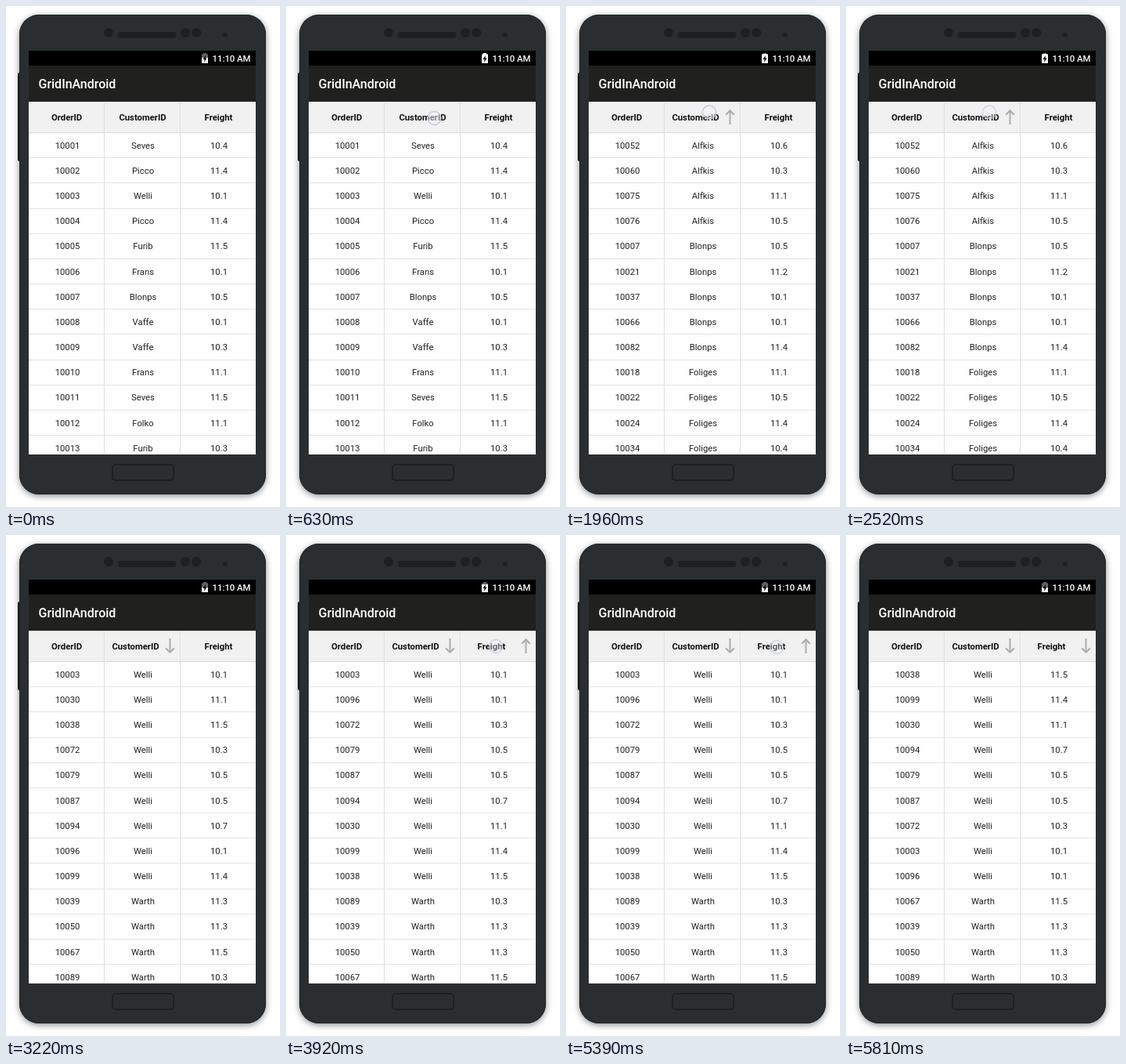
Animation of 350x639 px, one loop 5880 ms. Source, as an HTML page with a canvas:

```html
<!DOCTYPE html>
<html lang="en">
<head>
<meta charset="utf-8">
<title>Sortable grid</title>
<style>
html, body { margin: 0; width: 100%; height: 100%; overflow: hidden; background: #fff; }
canvas { display: block; width: 350px; height: 639px; }
</style>
</head>
<body>
<canvas id="stage"></canvas>
<script>
const W = 350, H = 639, LOOP = 5880, TICK = 70;
const canvas = document.getElementById('stage');
const ctx = canvas.getContext('2d');
const scale = window.devicePixelRatio || 1;
canvas.width = W * scale;
canvas.height = H * scale;

// Order number (offset from 10000) and freight, grouped by customer
const orders = {
  Alfkis: '52 10.6, 60 10.3, 75 11.1, 76 10.5',
  Blonps: '7 10.5, 21 11.2, 37 10.1, 66 10.1, 82 11.4',
  Foliges: '18 11.1, 22 10.5, 24 11.4, 34 10.4',
  Folko: '12 11.1',
  Frans: '6 10.1, 10 11.1',
  Furib: '5 11.5, 13 10.3',
  Picco: '2 11.4, 4 11.4',
  Seves: '1 10.4, 11 11.5',
  Vaffe: '8 10.1, 9 10.3',
  Warth: '39 11.3, 50 11.3, 67 11.5, 89 10.3',
  Welli: '3 10.1, 30 11.1, 38 11.5, 72 10.3, 79 10.5, 87 10.5, 94 10.7, 96 10.1, 99 11.4'
};
const rows = Object.entries(orders).flatMap(([name, list]) =>
  list.split(', ').map(item => {
    const [id, freight] = item.split(' ');
    return { id: 10000 + Number(id), name, freight };
  }));

// Sort direction per column: 1 ascending, -1 descending, 0 unsorted
const states = [
  { at: 0, name: 0, freight: 0 },
  { at: 1330, name: 1, freight: 0 },
  { at: 2730, name: -1, freight: 0 },
  { at: 3780, name: -1, freight: 1 },
  { at: 5460, name: -1, freight: -1 }
];
const compare = (a, b) => a < b ? -1 : a > b ? 1 : 0;
for (const s of states) {
  s.rows = [...rows].sort((a, b) =>
    s.name * compare(a.name, b.name) ||
    s.freight * compare(a.freight, b.freight) ||
    a.id - b.id).slice(0, 13);
}

const touches = [
  { x: 189.5, y: 143, from: 280, fade: 700, to: 1190 },
  { x: 183, y: 135.5, from: 1820, fade: 2380, to: 2940 },
  { x: 268, y: 142, from: 3360, fade: 3780, to: 4340 },
  { x: 269, y: 143, from: 4830, fade: 5250, to: 5740 }
];

// Top edge of the battery charge over time
const charge = [
  { at: 0, top: 66 }, { at: 70, top: 62 }, { at: 490, top: 60 },
  { at: 1540, top: 67 }, { at: 1680, top: 63 }, { at: 1960, top: 61 },
  { at: 3080, top: 60 }, { at: 3220, top: 67 }, { at: 3360, top: 63 },
  { at: 4480, top: 62 }, { at: 4690, top: 60 }, { at: 4830, top: 67 }
];
const current = (list, t) => list.filter(e => e.at <= t).pop();

function rect(x, y, w, h, color) {
  ctx.fillStyle = color;
  ctx.fillRect(x, y, w, h);
}
function round(x, y, w, h, r) {
  ctx.beginPath();
  ctx.roundRect(x, y, w, h, r);
}
function dot(x, y, r, color) {
  ctx.beginPath();
  ctx.arc(x, y, r, 0, Math.PI * 2);
  ctx.fillStyle = color;
  ctx.fill();
}
function text(str, x, y, size, weight, color, align = 'center') {
  ctx.font = `${weight} ${size}px Roboto, sans-serif`;
  ctx.textAlign = align;
  ctx.fillStyle = color;
  ctx.fillText(str, x, y);
}

function drawPhone() {
  const dark = '#1d2022', body = '#2a2e30';
  ctx.fillStyle = dark;
  round(15, 85, 5, 113, 2);
  ctx.fill();
  ctx.save();
  ctx.shadowColor = 'rgba(0,0,0,0.45)';
  ctx.shadowBlur = 8 * scale;
  ctx.shadowOffsetY = 2 * scale;
  ctx.fillStyle = body;
  round(17, 11, 315, 612, 25);
  ctx.fill();
  ctx.restore();
  ctx.strokeStyle = '#24282a';
  ctx.lineWidth = 1;
  round(17.5, 11.5, 314, 611, 24.5);
  ctx.stroke();

  for (const x of [131, 229, 243]) dot(x, 34, 6, dark);
  dot(280, 37, 3, dark);
  ctx.fillStyle = dark;
  round(143, 33, 74, 8, 2);
  ctx.fill();
  ctx.strokeStyle = dark;
  ctx.lineWidth = 2;
  round(136, 585, 78, 20, 4);
  ctx.stroke();
}

function drawBattery(top) {
  const shape = () => {
    ctx.beginPath();
    ctx.rect(252, 60, 4, 2);
    ctx.rect(250, 61.5, 8, 11.5);
  };
  shape();
  ctx.fillStyle = '#626262';
  ctx.fill();
  ctx.save();
  shape();
  ctx.clip();
  rect(250, top, 8, 73 - top, '#fff');
  ctx.restore();
  ctx.beginPath();
  [[254.8, 63], [251.6, 68], [253.5, 68], [253.2, 71.8], [256.5, 66.6], [254.6, 66.6]]
    .forEach(p => ctx.lineTo(...p));
  ctx.fillStyle = '#000';
  ctx.fill();
}

function drawBars(t) {
  rect(29, 57, 290, 20, '#000');
  rect(29, 76, 290, 46, '#20211f');
  drawBattery(current(charge, t).top);
  text('11:10 AM', 312.5, 71, 11.3, 500, '#fff', 'right');
  text('GridInAndroid', 41.5, 105, 16, 500, '#fff', 'left');
}

function drawArrow(x, dir) {
  ctx.save();
  ctx.translate(x, 141.5);
  ctx.scale(1, dir);
  ctx.strokeStyle = '#acacac';
  ctx.lineWidth = 2;
  ctx.beginPath();
  ctx.moveTo(0, 9.5);
  ctx.lineTo(0, -8);
  ctx.moveTo(-5.3, -2.8);
  ctx.lineTo(0, -8.3);
  ctx.lineTo(5.3, -2.8);
  ctx.stroke();
  ctx.restore();
}

function drawHeader(label, x, dir) {
  text(label, dir ? x - 9 : x, 145.7, 11.3, 700, '#111');
  if (dir) drawArrow(x + 35, dir);
}

function drawGrid(state) {
  const pitch = 32.17;
  rect(29, 122, 290, 450, '#fdfefd');
  rect(29, 122, 290, 39, '#f0f1f0');
  rect(29, 121, 290, 1, '#111');
  rect(29, 122, 290, 1, '#d5d6d5');
  for (const x of [125, 222]) rect(x, 122, 1, 450, '#dfe0df');
  for (let i = 0; i < 13; i++) {
    rect(29, Math.round(161 + i * pitch), 290, 1, i ? '#e4e5e4' : '#d8d9d8');
  }
  drawHeader('OrderID', 77.5, 0);
  drawHeader('CustomerID', 174.5, state.name);
  drawHeader('Freight', 271.5, state.freight);
  state.rows.forEach((row, i) => {
    const y = Math.round(181.7 + i * pitch);
    text(row.id, 78.5, y, 11.3, 400, '#222');
    text(row.name, 175, y, 11.3, 400, '#222');
    text(row.freight, 272, y, 11.3, 400, '#222');
  });
}

function drawTouch(t) {
  for (const p of touches) {
    if (t < p.from || t >= p.to) continue;
    ctx.save();
    ctx.globalAlpha = t < p.fade ? 1 : 1 - (t - p.fade) / (p.to - p.fade);
    dot(p.x, p.y, 8.5, 'rgba(244,244,250,0.5)');
    ctx.strokeStyle = '#c6c6df';
    ctx.lineWidth = 1.3;
    ctx.stroke();
    ctx.restore();
  }
}

function draw(t) {
  ctx.setTransform(scale, 0, 0, scale, 0, 0);
  rect(0, 0, W, H, '#fff');
  drawPhone();
  ctx.save();
  ctx.beginPath();
  ctx.rect(29, 57, 290, 515);
  ctx.clip();
  drawGrid(current(states, t));
  drawBars(t);
  drawTouch(t);
  ctx.restore();
}

let start;
function frame(now) {
  start ??= now;
  const t = (now - start) % LOOP;
  draw(Math.floor(t / TICK) * TICK);
  requestAnimationFrame(frame);
}
requestAnimationFrame(frame);
</script>
</body>
</html>
```
